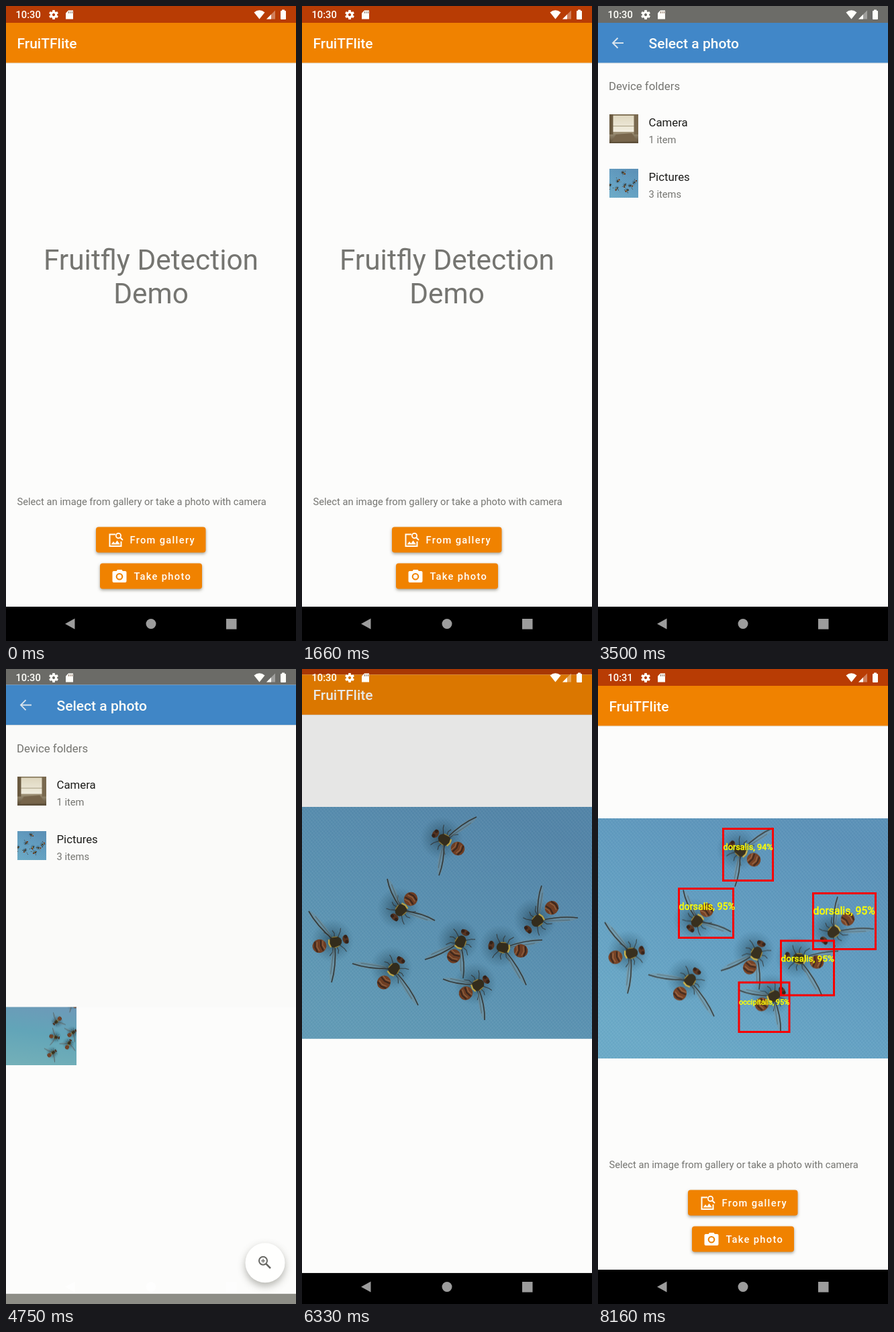
Recreate the animation shown at these times as an HTML page with a canvas. Size 432 by 944 pixels, loop 8200 ms.

```html
<!DOCTYPE html>
<html lang="en">
<head>
<meta charset="utf-8">
<title>Fruitfly detection demo</title>
<style>
html, body { margin: 0; width: 432px; height: 944px; overflow: hidden; background: #fcfcfb; }
canvas { display: block; }
</style>
</head>
<body>
<canvas id="stage" width="432" height="944"></canvas>
<script>
const W = 432, H = 944, LOOP = 8200, SLIDE = 425;
const CUE = { folders: 2990, grid: 4680, select: 5540, back: 6236, minute: 6600, detect: 6680 };
const PAPER = '#fcfcfb', ORANGE = '#f08200', WHITE = '#fffffa', GREY = '#757571', INK = '#1c1c1a';
const TAU = Math.PI * 2;
let c = document.getElementById('stage').getContext('2d');

const clamp = v => Math.max(0, Math.min(1, v));
const mix = (a, b, p) => a + (b - a) * p;
const smooth = t => t * t * (3 - 2 * t);

function rect(x, y, w, h, fill) {
  c.fillStyle = fill;
  c.fillRect(x, y, w, h);
}

function shape(points, fill) {
  c.beginPath();
  points.forEach(p => c.lineTo(...p));
  c.closePath();
  c.fillStyle = fill;
  c.fill();
}

function line(points, color, width = 1) {
  c.beginPath();
  points.forEach(p => c.lineTo(...p));
  c.strokeStyle = color;
  c.lineWidth = width;
  c.stroke();
}

function oval(x, y, rx, ry, fill, turn = 0) {
  c.beginPath();
  c.ellipse(x, y, rx, ry, turn, 0, TAU);
  c.fillStyle = fill;
  c.fill();
}

function ring(x, y, r, color, width) {
  c.beginPath();
  c.arc(x, y, r, 0, TAU);
  c.strokeStyle = color;
  c.lineWidth = width;
  c.stroke();
}

function roundRect(x, y, w, h, r, fill) {
  c.beginPath();
  c.roundRect(x, y, w, h, r);
  c.fillStyle = fill;
  c.fill();
}

function text(str, x, y, size, color, weight = 400, align = 'left', spacing = 0) {
  c.font = `${weight} ${size}px Roboto, sans-serif`;
  c.letterSpacing = spacing + 'px';
  c.textAlign = align;
  c.fillStyle = color;
  c.fillText(str, x, y);
}

function offscreen(w, h, paint) {
  const canvas = document.createElement('canvas');
  canvas.width = w;
  canvas.height = h;
  const outer = c;
  c = canvas.getContext('2d');
  paint();
  c = outer;
  return canvas;
}

function linear(x0, y0, x1, y1, ...colors) {
  const g = c.createLinearGradient(x0, y0, x1, y1);
  colors.forEach((color, i) => g.addColorStop(i / (colors.length - 1), color));
  return g;
}

// A fly is given by its head, the middle of its abdomen and its two wing tips.
function fly([hx, hy, ax, ay, ...tips]) {
  const tx = mix(hx, ax, .4), ty = mix(hy, ay, .4);
  const turn = Math.atan2(hy - ay, hx - ax), len = Math.hypot(hx - ax, hy - ay);
  const glow = c.createRadialGradient(tx - 4, ty - 2, 4, tx - 4, ty - 2, 32);
  glow.addColorStop(0, 'rgba(30,58,72,.55)');
  glow.addColorStop(1, 'rgba(45,90,115,0)');
  oval(tx - 4, ty - 2, 32, 32, glow);

  c.save();
  c.translate(tx, ty);
  c.rotate(turn);
  for (const side of [-1, 1]) {
    for (const k of [-1, 0, 1]) {
      line([[k * 5, side * 5], [k * 9 + 2, side * 13], [k * 13, side * 18]], 'rgba(50,46,40,.75)', 1.1);
    }
  }
  c.restore();

  for (let i = 0; i < 4; i += 2) {
    const dx = tips[i] - tx, dy = tips[i + 1] - ty, span = Math.hypot(dx, dy);
    c.save();
    c.translate(tx, ty);
    c.rotate(Math.atan2(dy, dx));
    oval(span * .58, 0, span * .42, 4.5, 'rgba(130,150,155,.42)');
    c.beginPath();
    c.moveTo(4, 0);
    c.quadraticCurveTo(span * .6, -5, span, 0);
    c.strokeStyle = 'rgba(48,50,48,.9)';
    c.lineWidth = 1.6;
    c.stroke();
    line([[5, 1], [span * .8, 2.5]], 'rgba(66,68,62,.45)');
    c.restore();
  }

  c.save();
  c.translate(tx, ty);
  c.rotate(turn);
  oval(-len * .6, 0, 10.5, 10, '#784326');
  for (const k of [-.72, -.5]) {
    line([[len * k, -8], [len * k - 2, 0], [len * k, 8]], '#3e2a20', 2);
    line([[len * k + 3, -7], [len * k + 1, 0], [len * k + 3, 7]], '#a2714c', 1.2);
  }
  oval(0, 0, 10, 8, '#38301f');
  line([[-8, -6], [-9.5, 0], [-8, 6]], '#c9b24e', 2.4);
  line([[-3, -8], [5, -7]], '#a58f40', 1.2);
  line([[-3, 8], [5, 7]], '#a58f40', 1.2);
  oval(len * .4, 0, 4.5, 6.5, '#5c3824');
  oval(len * .4 + 1, -4, 2.6, 2.6, '#38241a');
  oval(len * .4 + 1, 4, 2.6, 2.6, '#38241a');
  c.restore();
}

function smallFly(x, y, turn, scale = .3) {
  c.save();
  c.translate(x, y);
  c.rotate(turn);
  c.scale(scale, scale);
  fly([16, 0, -22, 0, -24, -42, -20, 44]);
  c.restore();
}

const FLIES = [
  [199, 40, 232, 62, 260, 15, 204, 102],
  [138, 164, 162, 137, 127, 107, 198, 169],
  [65, 197, 26, 207, 10, 155, 44, 261],
  [147, 228, 122, 261, 75, 233, 173, 295],
  [243, 187, 226, 222, 183, 227, 240, 255],
  [282, 206, 326, 214, 358, 198, 334, 265],
  [337, 182, 372, 150, 357, 117, 411, 165],
  [274, 257, 244, 277, 210, 256, 272, 317]
];

const photo = offscreen(W, 357, () => {
  rect(0, 0, W, 357, linear(300, 0, 120, 357, '#5c92b8', '#639fc2', '#6cabc8'));
  for (let x = -360; x < W; x += 5) {
    line([[x, 0], [x + 300, 357]], 'rgba(205,225,235,.08)', 1.6);
    line([[x + 360, 0], [x, 357]], 'rgba(30,75,115,.06)', 1.4);
  }
  FLIES.forEach(fly);
});

const tanPhoto = offscreen(105, 105, () => {
  rect(0, 0, 105, 105, linear(0, 0, 105, 90, '#b9a083', '#c4a67c', '#b49270'));
  oval(46, 46, 15, 20, '#92846c');
  oval(46, 83, 24, 24, '#8f7d69');
  oval(101, 34, 11, 9, '#937d67');
  smallFly(53, 4, 1.1);
  smallFly(39, 34, 2.6);
  smallFly(54, 33, .2);
  smallFly(61, 92, -.7);
});

const bluePhoto = offscreen(105, 105, () => {
  rect(0, 0, 105, 105, linear(30, 0, 15, 105, '#7097b8', '#62a5b8', '#74b0b8'));
  smallFly(98, 12, -2.4);
  smallFly(75, 40, 2.4);
  smallFly(74, 63, .2);
  smallFly(100, 56, -.6);
  smallFly(94, 72, -1.1);
  smallFly(70, 86, -.6);
});

const roomPhoto = offscreen(43, 43, () => {
  rect(0, 0, 43, 43, linear(0, 0, 0, 43, '#827458', '#b9ac90', '#584a34'));
  rect(6, 2, 31, 24, linear(0, 2, 0, 26, '#e0d8c0', '#f2eee0'));
  rect(0, 0, 6, 30, '#6a5a40');
  rect(37, 0, 6, 30, '#7a6a50');
  rect(6, 17, 31, 1, '#aaa084');
  shape([[10, 30], [34, 28], [42, 40], [4, 41]], '#78664c');
});

function crop(x, y, size) {
  c.drawImage(photo, 37.5, 0, 357, 357, x, y, size, size);
}

// Status and navigation icons stay in place while windows move below them.
function systemIcons(time) {
  text(time, 14.5, 18.3, 14.7, WHITE, 500);

  c.save();
  c.translate(71, 13);
  for (let i = 0; i < 6; i++) {
    c.rotate(TAU / 6);
    rect(-1.8, -7, 3.6, 5, WHITE);
  }
  c.restore();
  ring(71, 13, 3.7, WHITE, 3);

  shape([[93, 6.5], [100, 6.5], [100, 19.5], [89, 19.5], [89, 10.5]], WHITE);
  for (const x of [93, 95.5, 98]) rect(x, 8, 1, 3, '#8a7060');

  c.beginPath();
  c.moveTo(377.5, 19.5);
  c.lineTo(369.5, 9.5);
  c.quadraticCurveTo(377.5, 3, 385.5, 9.5);
  c.closePath();
  c.fillStyle = WHITE;
  c.fill();

  shape([[388, 19.5], [401, 19.5], [401, 6.5]], 'rgba(255,255,255,.35)');
  shape([[388, 19.5], [395, 19.5], [395, 12.5]], WHITE);
  rect(411, 5.5, 4, 2, WHITE);
  roundRect(409, 7, 8, 13, 1, WHITE);

  const nav = 'rgba(255,255,255,.61)';
  shape([[88, 918.5], [102.5, 910.5], [102.5, 926.5]], nav);
  oval(216, 918.5, 7.5, 7.5, nav);
  rect(328, 911, 15.5, 15.5, nav);
}

function header(title, x, bar, status) {
  rect(0, 0, W, 25, status);
  rect(0, 25, W, 59.5, bar);
  rect(0, 84.5, W, 1, 'rgba(120,120,110,.18)');
  text(title, x, 63, 21, WHITE, 500);
}

function navBar(fill = '#000') {
  rect(0, 893, W, 70, fill);
}

function button(x, y, w, label, labelX) {
  c.save();
  c.shadowColor = 'rgba(80,75,60,.5)';
  c.shadowBlur = 4;
  c.shadowOffsetY = 2;
  roundRect(x, y, w, 38, 4, ORANGE);
  c.restore();
  text(label, labelX, y + 24.5, 14.7, WHITE, 500, 'left', 1.31);
}

function galleryIcon() {
  line([[163, 785.5], [154.5, 785.5], [154.5, 803], [171.5, 803], [171.5, 796]], WHITE, 2);
  ring(167.5, 787.5, 3.6, WHITE, 1.8);
  line([[170, 790], [174, 794]], WHITE, 2);
  shape([[156.5, 800.5], [160, 796], [162.5, 799], [165.5, 794.5], [170, 800.5]], WHITE);
}

function cameraIcon() {
  roundRect(158.5, 840, 21, 17, 2, WHITE);
  shape([[164, 841], [166, 838], [172.5, 838], [174.5, 841]], WHITE);
  oval(169, 848.3, 5.3, 5.3, ORANGE);
  oval(169, 848.3, 3.2, 3.2, WHITE);
}

const BOXES = [
  [186.5, 237.5, 74, 77, 'dorsalis, 94%', 269, 12.7],
  [120.5, 326.5, 81, 73, 'dorsalis, 95%', 358, 14.3],
  [320.5, 333.5, 93, 83, 'dorsalis, 95%', 365, 15.8],
  [272.5, 404, 79, 81, 'dorsalis, 95%', 435, 13.6],
  [210, 466, 75, 73.5, 'occipitalis, 95%', 499, 11]
];

function detections() {
  for (const [x, y, w, h] of BOXES) {
    c.strokeStyle = '#f80000';
    c.lineWidth = 3;
    c.strokeRect(x, y, w, h);
  }
  for (const [x, , , , label, base, size] of BOXES) {
    text(label, x, base, size, '#ffff00');
    c.strokeStyle = '#ffff00';
    c.lineWidth = .5;
    c.strokeText(label, x, base);
  }
}

function home(loaded, detected) {
  rect(0, 0, W, H, PAPER);
  header('FruiTFlite', 16.5, ORANGE, '#b83c04');
  if (loaded) {
    c.drawImage(photo, 0, 221.5);
    if (detected) detections();
  } else {
    text('Fruitfly Detection', 216, 392, 42.4, GREY, 400, 'center');
    text('Demo', 216, 441.5, 42.4, GREY, 400, 'center');
  }
  text('Select an image from gallery or take a photo with camera', 16.5, 742, 14.7, GREY);
  button(134, 774.5, 163.5, 'From gallery', 184.5);
  galleryIcon();
  button(140, 828.5, 152, 'Take photo', 190.5);
  cameraIcon();
  navBar();
}

function folders() {
  rect(0, 0, W, H, PAPER);
  header('Select a photo', 75.5, '#4187c8', '#6c6c68');
  line([[38, 55], [22, 55]], '#dce6ee', 1.9);
  line([[29.5, 47.5], [22, 55], [29.5, 62.5]], '#dce6ee', 1.9);
  text('Device folders', 16, 125, 16.8, GREY);
  c.drawImage(roomPhoto, 16.5, 161);
  crop(16.5, 242, 43);
  text('Camera', 75.5, 179, 16.8, INK);
  text('1 item', 75.5, 204, 14.7, GREY);
  text('Pictures', 75.5, 260, 16.8, INK);
  text('3 items', 75.5, 285, 14.7, GREY);
  navBar();
}

function grid(selected) {
  rect(0, 0, W, H, PAPER);
  header('Select a photo', 75.5, '#4187c8', '#000');
  line([[21, 49], [33.5, 61.5]], '#eef2f4', 2);
  line([[33.5, 49], [21, 61.5]], '#eef2f4', 2);
  text('Today', 16.5, 116, 14.7, INK, 500);
  text('Tue, Nov 14, 2023', 16.5, 272.5, 14.7, INK, 500);
  text('Sun, Nov 12, 2023', 16.5, 429, 14.7, INK, 500);
  rect(0, 136, 105, 105, '#f0f0ea');
  const inset = 10.2 * selected;
  crop(inset, 136 + inset, 105 - 2 * inset);
  c.drawImage(tanPhoto, 0, 292.5);
  c.drawImage(bluePhoto, 0, 448.5);

  c.save();
  c.shadowColor = 'rgba(90,90,80,.45)';
  c.shadowBlur = 12;
  c.shadowOffsetY = 5;
  oval(386, 847, 29.5, 29.5, '#fffffe');
  c.restore();
  ring(383, 844, 6, '#666662', 2);
  line([[387.5, 848.5], [394, 855]], '#666662', 2.6);
  line([[380, 844], [386, 844]], '#666662', 1.3);
  line([[383, 841], [383, 847]], '#666662', 1.3);
  navBar('#8d8d86');
}

// The upper window slides by 4.1 % and is clipped from above; the lower one is dimmed.
function stack(lower, upper, slide, edge) {
  rect(0, 0, W, H, '#000');
  c.save();
  c.translate(0, -19 * (1 - slide));
  lower();
  c.restore();
  rect(0, 0, W, H, `rgba(0,0,0,${.1 * (1 - slide)})`);
  c.save();
  c.beginPath();
  c.rect(0, edge, W, H);
  c.clip();
  c.translate(0, 38.7 * slide);
  upper();
  c.restore();
}

function open(from, to, t) {
  stack(from, to, 1 - smooth(t), H * Math.pow(1 - t, 3.45));
}

function close(from, to, t) {
  stack(to, from, smooth(t), H * (1 - Math.pow(1 - t, 3.45)));
}

function scene(t) {
  const since = (cue, span) => clamp((t - cue) / span);
  const start = () => home(false, false);
  const picker = () => grid(smooth(since(CUE.select, 130)));
  if (t < CUE.folders) start();
  else if (t < CUE.folders + SLIDE) open(start, folders, since(CUE.folders, SLIDE));
  else if (t < CUE.grid) folders();
  else if (t < CUE.grid + SLIDE) open(folders, picker, since(CUE.grid, SLIDE));
  else if (t < CUE.back) picker();
  else if (t < CUE.back + SLIDE) close(folders, () => home(true, false), since(CUE.back, SLIDE));
  else home(true, t >= CUE.detect);
  systemIcons(t < CUE.minute ? '10:30' : '10:31');
}

function frame(now) {
  scene(now % LOOP);
  requestAnimationFrame(frame);
}
requestAnimationFrame(frame);
</script>
</body>
</html>
```
